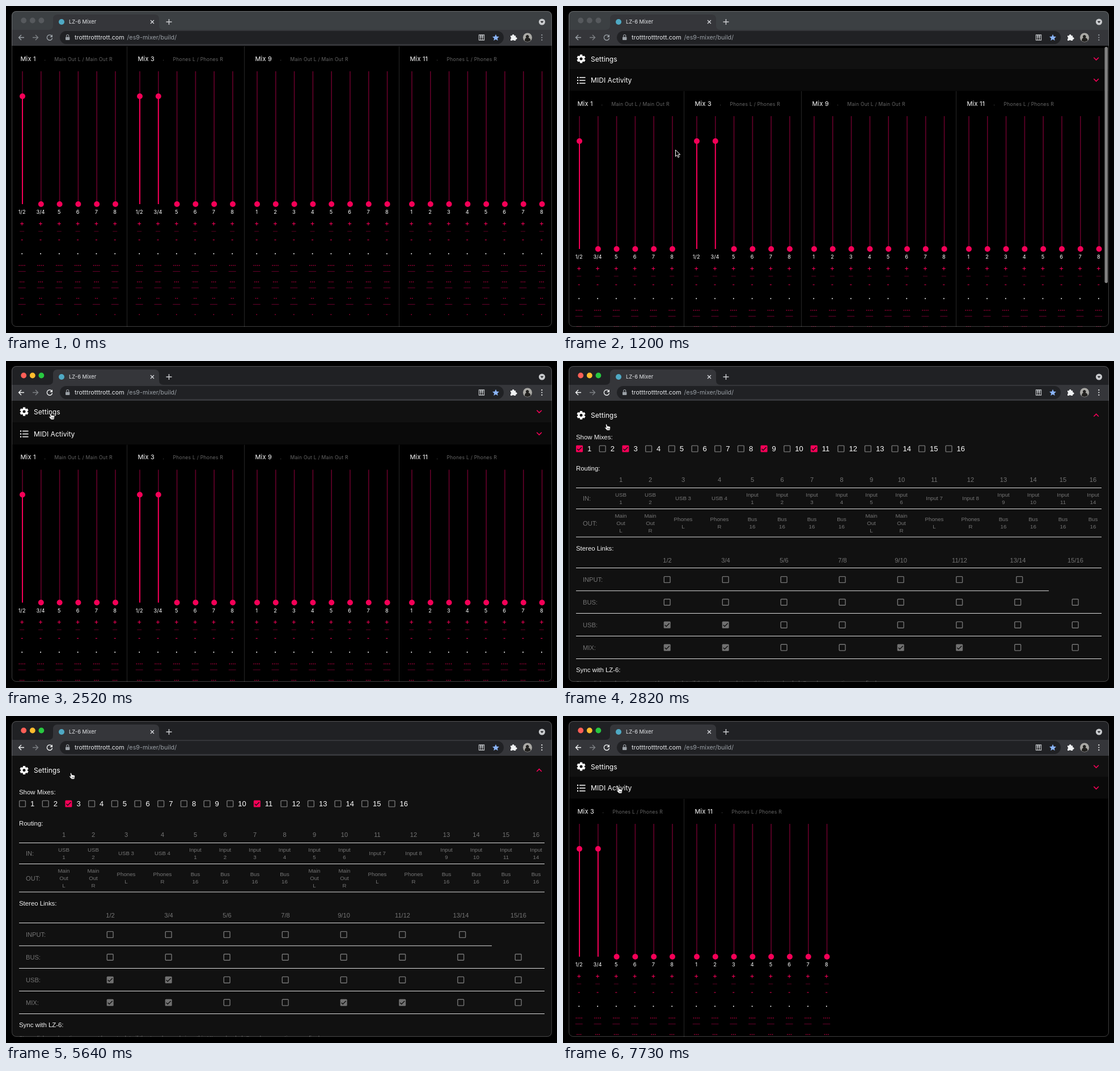
An HTML page with a canvas that plays this animation: 972 px wide and 576 px high, repeating every 8000 ms.

```html
<!DOCTYPE html>
<html lang="en">
<head>
<meta charset="utf-8">
<title>Mixer settings</title>
<style>
html, body { margin: 0; width: 100%; height: 100%; overflow: hidden; background: #000; }
canvas { display: block; }
</style>
</head>
<body>
<canvas id="stage" width="972" height="576"></canvas>
<script>
const c = document.getElementById('stage').getContext('2d');
const UI = 'Inter, sans-serif', BODY = '"Liberation Sans", Arial, sans-serif';
const PINK = '#f50057', PANEL = '#111', GREY = '#757575';
const LOOP = 8000;

// The picture only changes at these moments.
const STEPS = [0, 150, 300, 450, 600, 900, 1050, 1200, 1340, 1490, 1640, 1790, 1940, 2080, 2230,
  2520, 2670, 2820, 2970, 3120, 3270, 3570, 4020, 4170, 4310, 4460, 4610, 4900,
  5200, 5350, 5490, 5640, 5940, 6080, 6230, 6380, 7730];
const POINTER = [[150, 221, 545], [600, 198, 253], [1340, 198, 253], [1790, 61, 90], [1940, 61, 90],
  [2230, 75, 91], [2520, 75, 91], [2820, 73, 110], [3270, 33, 151], [3900, 33, 151], [4020, 66, 140],
  [4170, 160, 125], [4310, 270, 132], [4460, 376, 152], [4610, 357, 151], [5050, 357, 151],
  [5640, 111, 99], [7720, 111, 99], [7730, 94, 124]];
const SCROLL = [[0, 75], [750, 75], [900, 56], [1050, 14], [1200, -4], [1340, 0]];

const MIXES = [
  { n: 1, gap: 60, out: 'Main Out L / Main Out R', stereo: true, on: 1 },
  { n: 3, gap: 62, out: 'Phones L / Phones R', stereo: true, on: 2 },
  { n: 9, gap: 62, out: 'Main Out L / Main Out R', on: 0 },
  { n: 11, gap: 65, out: 'Phones L / Phones R', on: 0 }];
const ROUTE_X = [102, 154, 212, 276, 334, 386.5, 439, 491.5, 544, 597, 655, 719, 777, 829.5, 882, 935];
const LINK_X = [184, 287, 390, 493, 596, 699.5, 802.5, 904];

const clamp = v => Math.max(0, Math.min(1, v));

function track(keys, t) {
  let i = 0;
  while (i < keys.length - 1 && keys[i + 1][0] <= t) i++;
  const a = keys[i], b = keys[i + 1] || a;
  const k = b === a ? 0 : clamp((t - a[0]) / (b[0] - a[0]));
  return a.slice(1).map((v, j) => v + (b[j + 1] - v) * k);
}

// cubic-bezier(.4, 0, .2, 1)
function ease(x) {
  x = clamp(x);
  let lo = 0, hi = 1, s = x;
  for (let i = 0; i < 24; i++) {
    s = (lo + hi) / 2;
    const bx = 1.2 * s * (1 - s) ** 2 + .6 * s * s * (1 - s) + s ** 3;
    if (bx < x) lo = s; else hi = s;
  }
  return 3 * s * s * (1 - s) + s ** 3;
}

function text(str, x, mid, size, color, { font = BODY, align = 'left', gap = 0, weight = 400 } = {}) {
  c.font = `${weight} ${size}px ${font}`;
  c.letterSpacing = gap + 'px';
  c.textAlign = align;
  c.fillStyle = color;
  c.fillText(str, x, mid + size * .36);
}
function rect(x, y, w, h, color, r = 0) {
  c.fillStyle = color;
  c.beginPath();
  c.roundRect(x, y, w, h, r);
  c.fill();
}
function disc(x, y, r, color) {
  c.fillStyle = color;
  c.beginPath();
  c.arc(x, y, r, 0, 7);
  c.fill();
}
function shape(d, x, y, { fill, stroke, width = 1 }) {
  const p = new Path2D(d);
  c.save();
  c.translate(x, y);
  if (fill) { c.fillStyle = fill; c.fill(p); }
  if (stroke) { c.strokeStyle = stroke; c.lineWidth = width; c.stroke(p); }
  c.restore();
}

function browser(active) {
  const ink = active ? '#f1f3f4' : '#9aa0a6', dim = '#7d8084';
  rect(10, 9, 953, 34, active ? '#202124' : '#3c4043');
  shape('M75 42q8 0 8-8V23q0-8 8-8h171q8 0 8 8v11q0 8 8 8z', 0, 0, { fill: '#35363a' });
  rect(10, 42, 953, 28, '#35363a');
  (active ? ['#ff5f57', '#febc2e', '#28c840'] : Array(3).fill('#56595d'))
    .forEach((color, i) => disc(31.2 + 15.6 * i, 25.5, 4.9, color));
  disc(98, 28, 5, '#4fa9c4');
  text('LZ-6 Mixer', 111, 28, 9.4, '#e3e5e8', { font: UI });
  shape('M-3-3 3 3M3-3-3 3', 258, 28, { stroke: '#dadce0', width: 1.3 });
  shape('M-5 0H5M0-5V5', 287.5, 28, { stroke: '#cfd1d4', width: 1.4 });
  disc(945.5, 28, 5.6, '#c8cacd');
  shape('M-2.8-1.3h5.6L0 2z', 945.5, 28, { fill: '#202124' });

  shape('M5 0H-4.5M0-4.5-4.5 0 0 4.5', 27, 55.5, { stroke: ink, width: 1.4 });
  shape('M-5 0H4.5M0-4.5 4.5 0 0 4.5', 52, 55.5, { stroke: dim, width: 1.4 });
  shape('M3.7-2.8A4.7 4.7 0 1 0 4.6 1', 77, 55.5, { stroke: ink, width: 1.4 });
  shape('M5-5.2V-.5H.3z', 77, 55.5, { fill: ink });
  rect(95, 44, 783, 23, '#202124', 11.5);
  rect(105, 54.5, 7.4, 5.6, '#9aa0a6', 1);
  shape('M-2 0V-2a2 2 0 0 1 4 0V0', 108.7, 54.5, { stroke: '#9aa0a6', width: 1.1 });
  text('trotttrotttrott.com', 121, 55.5, 10.75, '#e8eaed', { font: UI });
  text('/es9-mixer/build/', 213.5, 55.5, 10.75, '#9aa0a6', { font: UI });
  shape('M-4.6-4.6h9.2v9.2h-9.2zM-1.6-4.6V4.6M1.6-4.6V4.6', 839, 55.5, { stroke: '#c4c7ca', width: 1.1 });
  rect(836.4, 51, 2, 5, '#c4c7ca');
  rect(839.6, 51, 2, 5, '#c4c7ca');
  shape('M0-6 1.7-2 6-1.7 2.8 1.1 3.7 5.2 0 3-3.7 5.2-2.8 1.1-6-1.7-1.7-2z', 864, 55.8, { fill: '#8ab4f8' });
  shape('M-5-3.2h3a1.8 1.8 0 1 1 3.4 0h2.8v3a1.8 1.8 0 1 1 0 3.4v2.4h-3.2a1.7 1.7 0 0 0-3.2 0H-5V2.4a1.7 1.7 0 0 0 0-3.2z',
    895, 55.5, { fill: '#f1f3f4' });
  disc(920, 55.5, 8, '#aaa9a5');
  shape('M-5 6q0-5 3-5.500a2.700 2.700 0 1 1 3.500 0q4 .5 4 5Q0 9-5 6z', 920, 55.5, { fill: '#22211f' });
  [-4.3, 0, 4.3].forEach(d => disc(945.3, 55.5 + d, 1.1, ink));
}

function checkbox(x, y, on, color) {
  if (!on) {
    c.strokeStyle = GREY;
    c.lineWidth = 1.4;
    c.beginPath();
    c.roundRect(x - 5.4, y - 5.4, 10.8, 10.8, 1);
    c.stroke();
    return;
  }
  rect(x - 6, y - 6, 12, 12, color, 1.5);
  shape('M-4 .2-1.500 2.700 4-2.800', x, y, { stroke: PANEL, width: 1.4 });
}

function chevron(y, turn) {
  c.save();
  c.translate(940.6, y);
  c.rotate(Math.PI * turn);
  shape('M-4.300-2.200 0 2.100 4.300-2.200', 0, 0, { stroke: PINK, width: 1.6 });
  c.restore();
}

function gear(x, y) {
  c.strokeStyle = '#fff';
  c.lineWidth = 3.4;
  c.beginPath();
  c.arc(x, y, 4.2, 0, 7);
  c.stroke();
  for (let i = 0; i < 6; i++) {
    const a = Math.PI * (i / 3 + 1 / 6);
    c.lineWidth = 4.2;
    c.beginPath();
    c.moveTo(x + 5 * Math.cos(a), y + 5 * Math.sin(a));
    c.lineTo(x + 7.6 * Math.cos(a), y + 7.6 * Math.sin(a));
    c.stroke();
  }
}

function settings(dy, checked, hover) {
  const line = (y, end = 950) => rect(23, y + dy - .5, end - 23, 1, '#dcdcdc');
  const label = (s, y) => text(s, 23, y + dy, 11.4, '#f4f4f4');
  const head = (s, x, y) => text(s, x, y + dy, 11.1, GREY, { align: 'center' });
  const side = (s, y) => text(s, 35, y + dy, 11.1, GREY);
  const cell = (s, x, y) => {
    const rows = s.split('|');
    rows.forEach((row, i) =>
      text(row, x, y + dy + 13 * (i - (rows.length - 1) / 2), 9.7, GREY, { align: 'center' }));
  };

  label('Show Mixes:', 133.5);
  for (let n = 1; n <= 16; n++) {
    const x = n <= 10 ? 29 + 40.7 * (n - 1) : 395.3 + 47.55 * (n - 10), on = checked.includes(n);
    if (hover === n && on) disc(x, 154.5 + dy, 12, 'rgba(245,0,87,.1)');
    checkbox(x, 154.5 + dy, on, PINK);
    text(n, x + 14, 154.5 + dy, 13, '#fff');
  }

  label('Routing:', 189);
  const inputs = [1, 2, 3, 4, 5, 6, 7, 8, 9, 10, 11, 14];
  ROUTE_X.forEach((x, i) => {
    const wide = [2, 3, 10, 11].includes(i), pair = i % 8;
    head(i + 1, x, 209.5);
    cell((i < 4 ? 'USB*' + (i + 1) : 'Input*' + inputs[i - 4]).replace('*', wide ? ' ' : '|'), x, 242);
    cell(i > 11 || pair > 3 ? 'Bus|16' : (pair < 2 ? 'Main|Out|' : 'Phones|') + 'LR'[i % 2], x, 285.5);
  });
  side('IN:', 242);
  side('OUT:', 286);
  [223.5, 260.5, 310].forEach(y => line(y));

  label('Stereo Links:', 330);
  LINK_X.forEach((x, i) => head(`${2 * i + 1}/${2 * i + 2}`, x, 351));
  [['INPUT:', []], ['BUS:', []], ['USB:', [0, 1]], ['MIX:', [0, 1, 4, 5]]].forEach(([name, on], r) => {
    const y = 385 + 39.9 * r;
    side(name, y);
    LINK_X.forEach((x, i) => {
      if (r || i < 7) checkbox(x - .3 + (!r && i === 6 ? 3 : 0), y + dy, on.includes(i), '#707070');
    });
    line(y + 19.7, r ? 950 : 857);
  });
  line(364.5);
  label('Sync with LZ-6:', 544);
  text("Stereo links and routing may not be up to date if they've changed since this UI was loaded. " +
    'Sync by requesting a config dump.', 23, 566, 9.92, '#5c5c5c');
}

function dots(count, x, y) {
  for (let i = 0; i < count; i++) rect(x + 3.2 * (i - (count - 1) / 2) - .7, y - .7, 1.4, 1.4, '#c20045');
}

function mix({ n, gap, out, stereo, on }, x, top, first) {
  if (!first) rect(x - 23, top, 1, 500, '#262626');
  text('Mix ' + n, x - 3.6, top + 22, 11, '#fff', { font: UI, gap: .2 });
  text('.', x + gap - 21.5, top + 22, 8.6, '#666', { font: UI });
  text(out, x + gap - 3.5, top + 22.5, 8.6, '#666', { font: UI, gap: .25 });
  const names = stereo ? ['1/2', '3/4', 5, 6, 7, 8] : [1, 2, 3, 4, 5, 6, 7, 8];
  names.forEach((name, i) => {
    const sx = x + 32.8 * i, mid = sx - .8, knob = top + (i < on ? 88 : 278);
    rect(sx - .8, top + 44, 1.6, 234, '#66002a');
    if (i < on) rect(sx - 1, knob, 2, top + 278 - knob, PINK);
    disc(sx, knob, 5, PINK);
    text(name, mid, top + 292, 9.2, '#fff', { font: UI, align: 'center' });
    shape('M-3 0H3M0-3V3', mid, top + 312.5, { stroke: PINK, width: 1.1 });
    rect(mid - 4, top + 325.5, 8, 1, '#5c0023');
    rect(mid - 1.500, top + 340.5, 3, 1.1, PINK);
    rect(mid - .8, top + 364.5, 1.700, 1.700, '#fff');
    [4, 3, 2].forEach((count, row) => {
      dots(count, mid, top + 386 + 29 * row);
      rect(mid - 6.5, top + 396 + 29 * row, 13, 1, '#66002a');
    });
    dots(1, mid, top + 472.5);
  });
}

function page(t) {
  const opening = t < 5930, start = opening ? 2510 : 5930;
  const state = span => {
    const k = ease((t - start) / span);
    return opening ? k : 1 - k;
  };
  const head = state(150), body = 550 * state(300);
  const [scroll] = track(SCROLL, t);
  const checked = [1, 3, 9, 11].filter(n => !(n === 1 && t >= 3570) && !(n === 9 && t >= 4900));
  const hover = t >= 3270 && t < 4020 ? 1 : t >= 4460 && t < 5200 ? 9 : 0;
  const y = 70 - scroll, bodyTop = y + 37 + 12 * head, midi = bodyTop + body;

  rect(11, y, 951, midi - y, PANEL);
  gear(32, y + 19 + 6.5 * head);
  text('Settings', 49, y + 19.3 + 6.5 * head, 12.1, '#fff', { font: UI });
  chevron(y + 19 + 6.5 * head, head);
  if (body > 0) {
    c.save();
    c.beginPath();
    c.rect(11, bodyTop, 951, body);
    c.clip();
    settings(12 * head - 12, checked, hover);
    c.restore();
  }

  rect(11, midi, 951, 38.5, '#0a0a0a');
  [-5, 0, 5].forEach(d => {
    disc(26, midi + 20 + d, 1.2, '#fff');
    rect(29, midi + 19.2 + d, 10.5, 1.6, '#fff');
  });
  text('MIDI Activity', 49, midi + 20, 12.1, '#fff', { font: UI });
  chevron(midi + 19.500, 0);

  let x = 29;
  MIXES.filter(m => checked.includes(m.n)).forEach((m, i) => {
    mix(m, x, midi + 39, !i);
    x += m.stereo ? 207 : 273;
  });

  if (t >= 900 && t < 1790) {
    c.globalAlpha = t < 1640 ? 1 : .5;
    rect(955.5, 72 + Math.max(0, scroll), 5.5, 416, '#808080', 2.75);
    c.globalAlpha = 1;
  }
}

function pointer(t) {
  if (t < 150) return;
  const [x, y] = track(POINTER, t);
  c.lineJoin = 'round';
  if (t < 2080)
    shape('M.5.5V12L3.200 9.500 5 13.700 7 12.800 5.200 8.800H8.800z', x, y, { fill: '#000', stroke: '#fff', width: 1 });
  else
    shape('M3.200 7.500 2.300 2q.6-1.700 2.100-.6L5.500 5q1-.9 1.900.1 1.200-.6 1.800.4 1.300-.2 1.400 1V9q-.3 1.700-1.200 3.300H4.800Q3 10.500.8 8q-.3-1.700 1-1.400z',
      x, y, { fill: '#fff', stroke: '#000', width: .8 });
  if (t >= 2080) shape('M5.700 8v2.500M7.300 8v2.500M8.900 8v2.500', x, y, { stroke: '#000', width: .6 });
  c.lineJoin = 'miter';
}

function draw(now) {
  const time = now % LOOP, t = STEPS.filter(s => s <= time).pop() || 0;
  rect(0, 0, 972, 576, '#000');
  c.save();
  c.beginPath();
  c.roundRect(10, 9, 953, 556, 8);
  c.clip();
  page(t);
  browser(t >= 1940);
  c.restore();
  c.strokeStyle = 'rgba(255,255,255,.24)';
  c.lineWidth = 1;
  c.beginPath();
  c.roundRect(10.5, 9.5, 952, 555, 7.5);
  c.stroke();
  pointer(t);
}

const begin = performance.now();
(function tick() {
  draw(performance.now() - begin);
  requestAnimationFrame(tick);
})();
</script>
</body>
</html>
```
